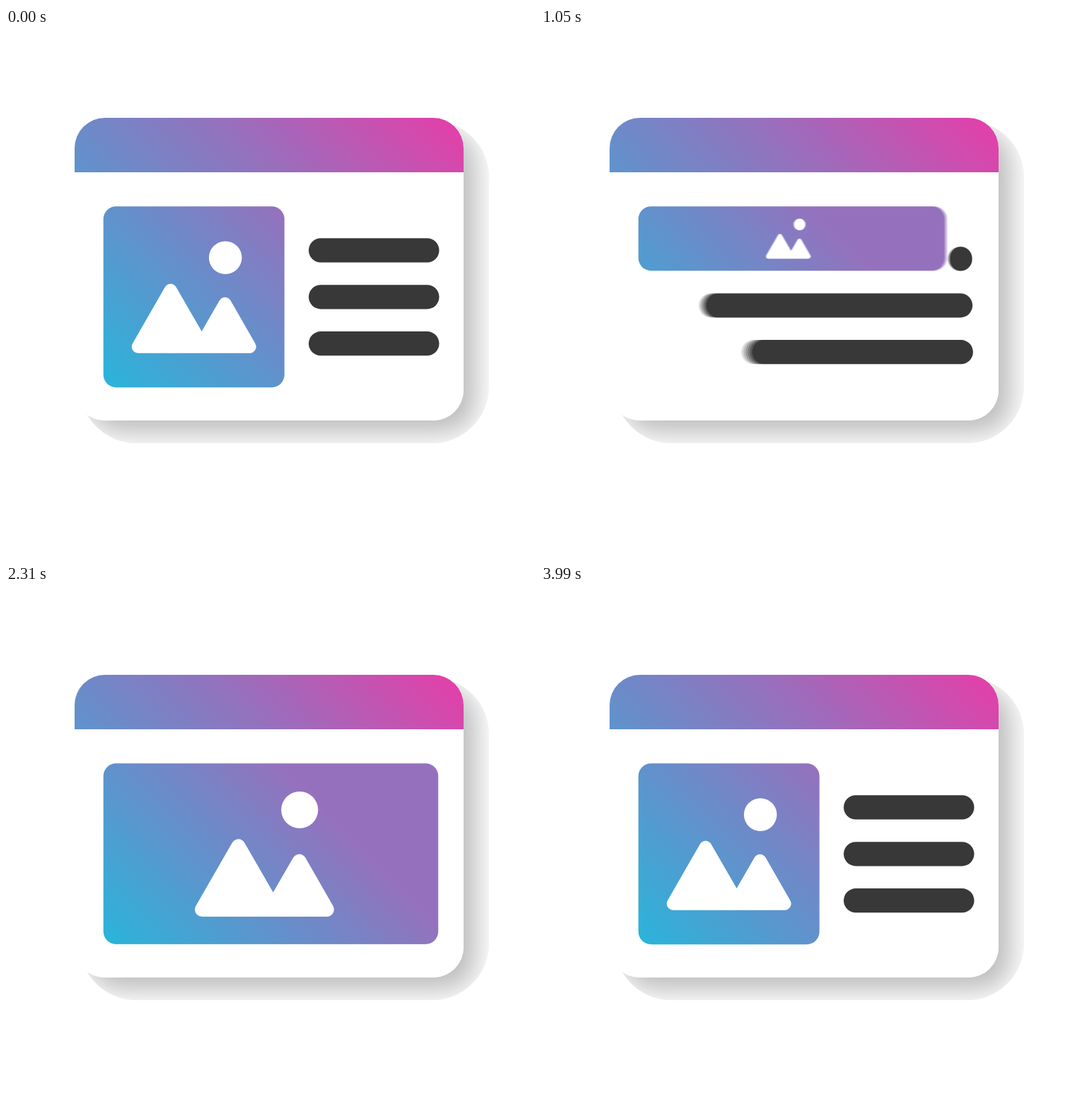
Write an HTML page with a canvas that moves like this. It is 748 px wide and 748 px high and loops after 4.5 s.

```html
<!DOCTYPE html>
<html lang="en">
<head>
<meta charset="utf-8">
<title>Card layouts</title>
<style>
html, body { margin: 0; width: 100%; height: 100%; overflow: hidden; background: #fff; }
canvas { display: block; }
</style>
</head>
<body>
<canvas id="stage" width="748" height="748"></canvas>
<script>
const LOOP = 4500, STEP = 30, SHUTTER = 15, SAMPLES = 6;

// Start of each change of layout, in ms.
const FLATTEN = 300, WIDEN = 840, HEIGHTEN = 1890, NARROW = 2948, REFILL = 3350;

const lerp = (a, b, p) => a + (b - a) * p;

// Eased progress, 0 to 1, of a move beginning at start.
function move(t, start, duration = 480) {
  const p = Math.min(1, Math.max(0, (t - start) / duration));
  return 1 - (1 - p) ** 3;
}

const ctx = document.getElementById('stage').getContext('2d');
const area = { x: 120, y: 240, w: 510, h: 285 };
const layer = document.createElement('canvas');
layer.width = area.w;
layer.height = area.h;
const g = layer.getContext('2d');
g.translate(-area.x, -area.y);

// One diagonal blend runs through the header and the picture.
function blend(c, middle) {
  const grad = c.createLinearGradient(138, 508, 565.5, 80.5);
  grad.addColorStop(0, '#29b5db');
  grad.addColorStop(middle, '#9571bd');
  if (c === ctx) grad.addColorStop(1, '#df42aa');
  return grad;
}
const headerFill = blend(ctx, 0.63);
const photoFill = blend(g, 0.585);

function box(c, x, y, w, h, r, fill) {
  c.beginPath();
  c.roundRect(x, y, w, h, r);
  c.fillStyle = fill;
  c.fill();
}

function drawCard() {
  ctx.fillStyle = '#fff';
  ctx.fillRect(0, 0, 748, 748);
  ctx.save();
  ctx.beginPath();
  ctx.roundRect(104, 131, 579, 456, 80);
  ctx.clip();
  ctx.shadowColor = 'rgba(0,0,0,.27)';
  ctx.shadowBlur = 38;
  ctx.shadowOffsetX = ctx.shadowOffsetY = 18;
  box(ctx, 97, 127, 550, 428, 43, '#fff');
  ctx.restore();
  box(ctx, 97, 127, 550, 428, 43, '#fff');
  box(ctx, 97, 127, 550, 77, [43, 43, 0, 0], headerFill);
}

function drawIcon(cx, cy, scale) {
  g.save();
  g.translate(cx, cy);
  g.scale(scale, scale);
  g.fillStyle = g.strokeStyle = '#fff';
  g.lineWidth = 18;
  g.lineJoin = 'round';
  g.beginPath();
  [[-79, 70.5], [-33, -9.5], [11, 66.8], [44, 9.5], [79, 70.5]].forEach(p => g.lineTo(...p));
  g.closePath();
  g.fill();
  g.stroke();
  g.beginPath();
  g.arc(44.5, -55.5, 23.3, 0, 2 * Math.PI);
  g.fill();
  g.restore();
}

function drawBar(t, i) {
  let x = 428, right = 612.5, y = 297.3 + 65.9 * i;
  g.globalAlpha = 1;
  if (t < NARROW) {
    // The first bar closes up, the others stretch; then they sink and fade.
    const stretch = move(t, WIDEN + 60 * i);
    const fade = move(t, HEIGHTEN, 230);
    x = lerp(x, i ? 132.3 : 609, stretch);
    right = lerp(right, 609, stretch);
    y += 12 * move(t, FLATTEN) + 18.6 * fade;
    g.globalAlpha = 1 - fade;
  } else {
    right = lerp(x, right, move(t, REFILL + 170 * (2 - i), 300));
  }
  if (right - x > 0.5) box(g, x, y, right - x, 34.2, 17.1, '#383838');
  g.globalAlpha = 1;
}

function drawPhoto(t) {
  const flat = move(t, FLATTEN) - move(t, HEIGHTEN);
  const wide = move(t, WIDEN) - move(t, NARROW);
  const x = 137.7, y = 252.2;
  const w = 256 + 217.5 * wide;
  const h = 256 - 165 * flat;
  box(g, x, y, w, h, 18, photoFill);
  drawIcon(x + w / 2 + 2 * flat - 9 * wide, y + h / 2,
    1 - 0.642 * flat + 0.12 * wide * (1 - flat));
}

function drawContent(t) {
  g.fillStyle = '#fff';
  g.fillRect(area.x, area.y, area.w, area.h);
  for (let i = 0; i < 3; i++) drawBar(t, i);
  drawPhoto(t);
}

// Average a few instants inside the shutter time for motion blur.
function render(t) {
  for (let i = 0; i < SAMPLES; i++) {
    drawContent(t + ((i + 0.5) / SAMPLES - 0.5) * SHUTTER);
    ctx.globalAlpha = 1 / (i + 1);
    ctx.drawImage(layer, area.x, area.y);
  }
  ctx.globalAlpha = 1;
}

drawCard();
const began = performance.now();
let shown = -1;
function tick() {
  const t = Math.floor(((performance.now() - began) % LOOP) / STEP) * STEP;
  if (t !== shown) render(shown = t);
  requestAnimationFrame(tick);
}
tick();
</script>
</body>
</html>
```
